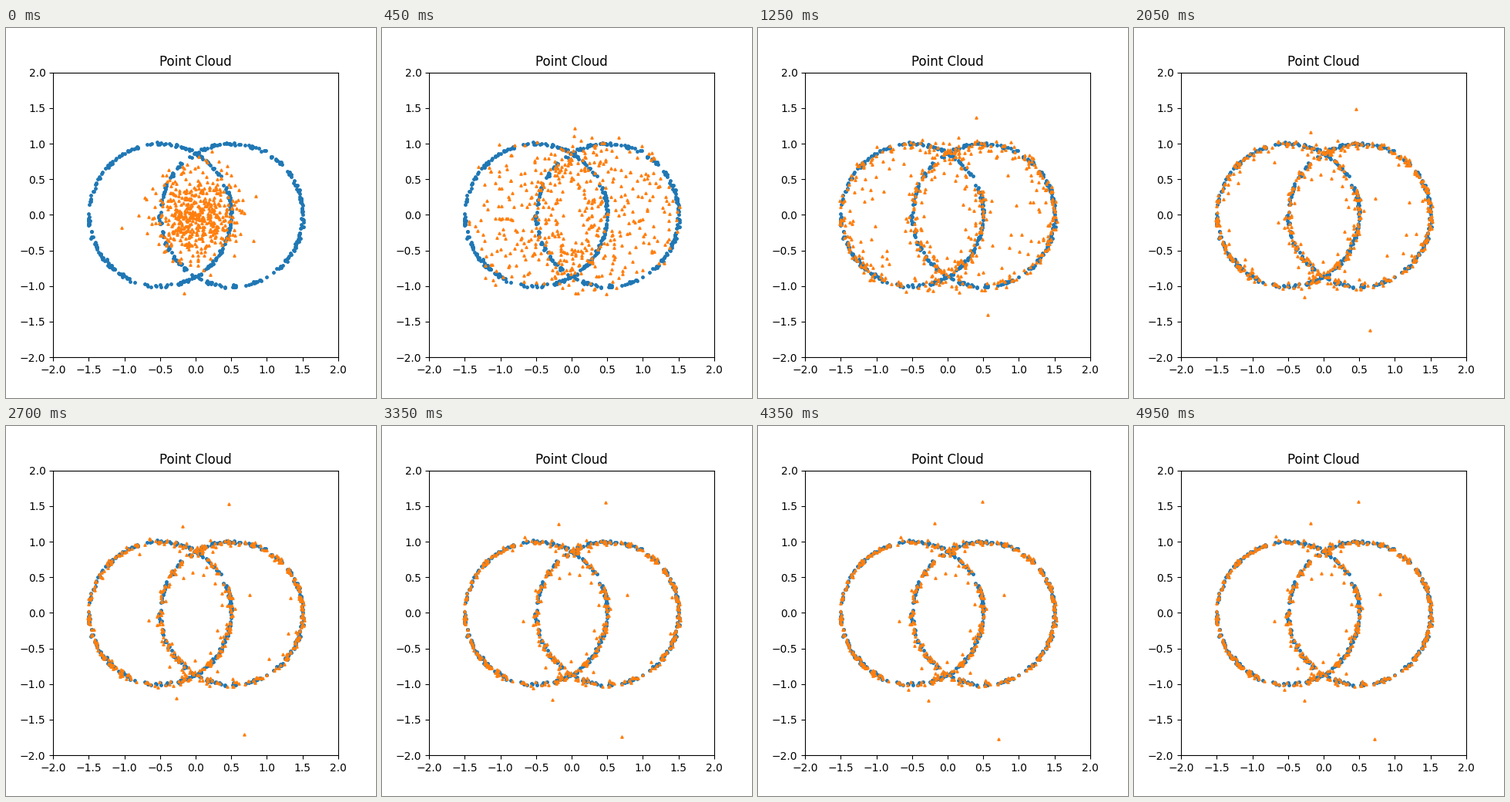
A matplotlib script that plays this animation: 480x480 px, repeating every 5 s.

```python
import numpy as np
import matplotlib.pyplot as plt
from matplotlib.animation import FuncAnimation

FRAMES, STEP = 100, 50
N = 500
STRAYS = 40
rng = np.random.default_rng(7)


def ring(cx, count):
    """Slightly noisy unit circle around (cx, 0)."""
    a = rng.uniform(0, 2 * np.pi, count)
    pts = np.column_stack([cx + np.cos(a), np.sin(a)])
    return pts + rng.normal(0, 0.01, pts.shape)


def match_by_direction(start, goal, group=20):
    """Pair points by angle, then by radius inside each small sector."""
    def order(p):
        idx = np.argsort(np.arctan2(p[:, 1], p[:, 0]))
        r = np.hypot(p[:, 0], p[:, 1])
        return np.concatenate([s[np.argsort(r[s])]
                               for s in np.split(idx, len(p) // group)])

    paired = np.empty_like(goal)
    paired[order(start)] = goal[order(goal)]
    return paired


rings = np.vstack([ring(-0.5, N // 2), ring(0.5, N // 2)])
start = rng.normal(0, 0.3, (N, 2))
goal = match_by_direction(start, rings)

# Points near the sides travel further, settle later and scatter less.
side = np.abs(goal[:, 0])
tau = (300 + 140 * side) * np.exp(rng.normal(0, 0.55, N))
power = np.full(N, 1.6)
spread = 1.25 - 0.6 * side
jitter = np.clip(rng.standard_t(3, (N, 2)), -2.2, 2.2)

# A few points drift slowly and never settle on a ring.
stray = rng.choice(np.flatnonzero(side < 0.7), STRAYS, replace=False)
scale = np.exp(rng.normal(0, 0.3, STRAYS))
goal[stray] *= np.clip(scale, 0.3, 1.75)[:, None]
tau[stray], power[stray], spread[stray] = 900, 1, 0


def positions(t):
    left = np.exp(-(t / tau) ** power)
    scatter = spread * (0.015 + 0.15 * np.exp(-t / 800)) * (1 - left)
    return goal + (start - goal) * left[:, None] + jitter * scatter[:, None]


fig, ax = plt.subplots(figsize=(4.8, 4.8), dpi=100)
ax.set_aspect("equal")
ax.set(xlim=(-2, 2), ylim=(-2, 2), title="Point Cloud")
ax.plot(rings[:, 0], rings[:, 1], "o", color="C0", ms=2.5)
cloud, = ax.plot(start[:, 0], start[:, 1], "^", color="C1", ms=2.4)


def update(frame):
    cloud.set_data(*positions(frame * STEP).T)
    return cloud,


anim = FuncAnimation(fig, update, frames=FRAMES, interval=STEP, repeat=True)
plt.show()
```
